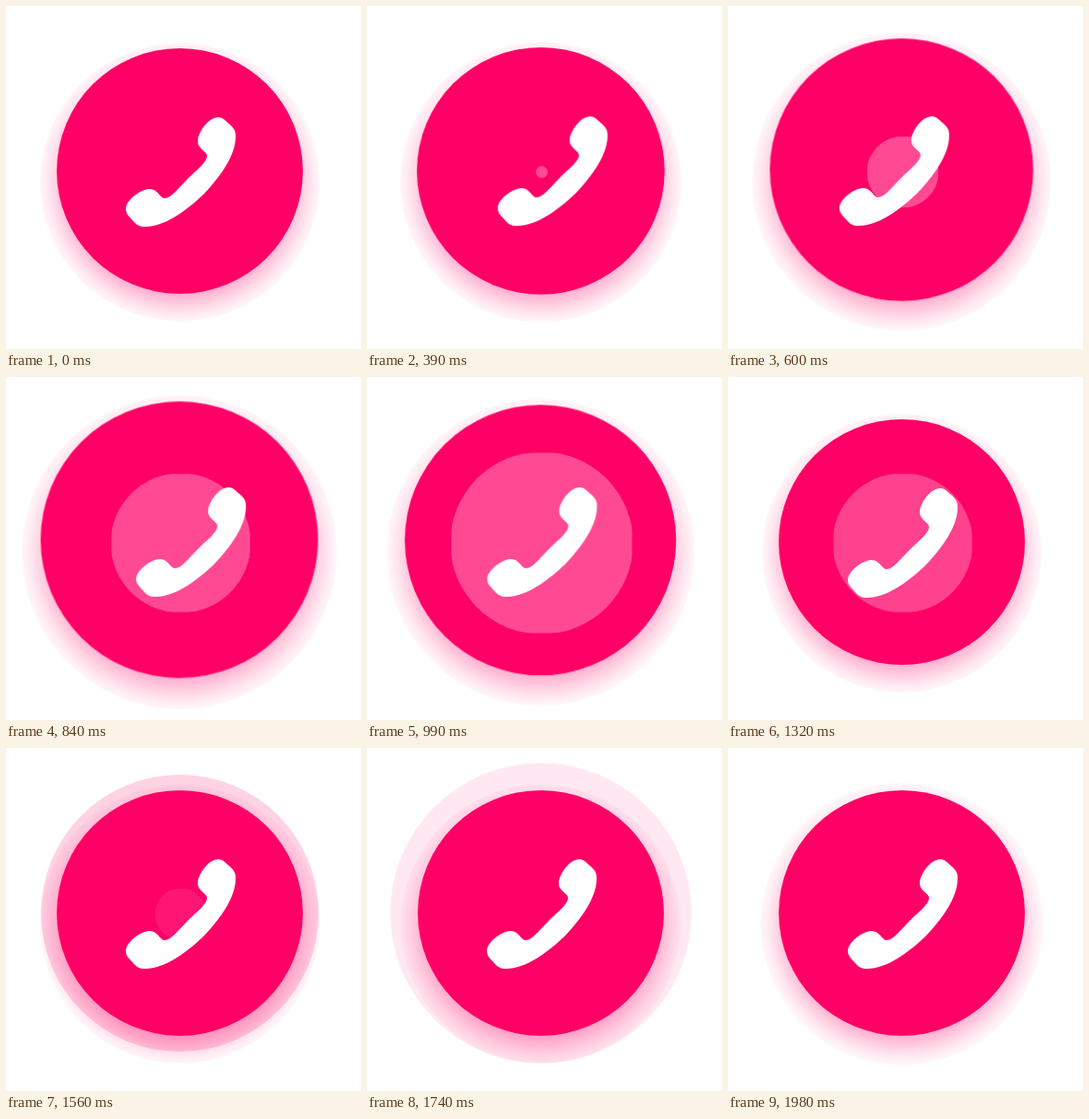
These frames come from a looping animation (385 by 373 pixels, 2400 ms). An HTML page:

```html
<!DOCTYPE html>
<html lang="en">
<head>
<meta charset="utf-8">
<title>Ringing call button</title>
<style>
  :root { --pink: #ff0066; --loop: 2400ms; }

  html, body {
    margin: 0;
    width: 100%;
    height: 100%;
    overflow: hidden;
    background: #fff;
  }

  .stage { position: relative; width: 385px; height: 373px; overflow: hidden; }
  .stage div, .phone { position: absolute; }

  .button, .shadow, .ring, .disc, .ripple, .phone {
    animation: var(--loop) linear infinite;
  }

  .button {
    left: 55px;
    top: 46px;
    width: 267px;
    height: 267px;
    transform-origin: 137.5px 153px;
    animation-name: pulse;
  }

  .button div { inset: 0; border-radius: 50%; }

  .shadow {
    box-shadow: 0 12px 30px rgba(255, 0, 102, .4);
    animation-name: trim;
  }

  .ring { background: var(--pink); animation-name: ring; }
  .disc { background: var(--pink); }

  .ripple {
    left: 73px;
    top: 64px;
    width: 233px;
    height: 233px;
    background: #fff;
    clip-path: circle(50.6%);
    animation-name: ripple;
  }

  .phone {
    left: 130px;
    top: 121px;
    width: 119px;
    height: 119px;
    overflow: visible;
    fill: #fff;
    animation-name: shake;
    animation-timing-function: ease-in-out;
  }

  @keyframes pulse {
    0%, 12.5% { transform: scale(1); animation-timing-function: ease-in-out; }
    36.25% { transform: scale(1.128); animation-timing-function: ease-in-out; }
    52.5%, 100% { transform: scale(1); }
  }

  /* The soft shadow ends in a crisp edge. */
  @keyframes trim {
    0%, 82.49% { clip-path: circle(151.5px at 50% calc(50% + 12px)); }
    82.5%, 100% { clip-path: circle(153.5px at 50% calc(50% + 12px)); }
  }

  @keyframes ring {
    0%, 54.99% { transform: scale(1); opacity: 0; }
    55% { transform: scale(1); opacity: .28; }
    81.25%, 100% { transform: scale(1.334); opacity: 0; }
  }

  @keyframes ripple {
    0%, 14.54% { transform: scale(0); opacity: .29; }
    46.33% { transform: scale(1); }
    53.25% { opacity: .29; }
    69.7% { opacity: 0; }
    70.88%, 100% { transform: scale(0); opacity: 0; }
  }

  @keyframes shake {
    0%, 9% { transform: translate(0, 0); }
    18.25%, 36.75% { transform: translate(13px, -1px); }
    27.5%, 46% { transform: translate(-13px, -1px); }
    55%, 100% { transform: translate(0, 0); }
  }
</style>
</head>
<body>
  <div class="stage">
    <div class="button">
      <div class="shadow"></div>
      <div class="ring"></div>
      <div class="disc"></div>
    </div>
    <div class="ripple"></div>
    <svg class="phone" viewBox="0 0 119 119" aria-hidden="true">
      <path d="M67 67C77 57 88 49 88 42C88 37 77 34 78 25C79 15 90 0 100 0
               C106 0 109 5 113 8C117 12 119 14 119 21C119 42 102 65 84 84
               C65 102 42 119 21 119C14 119 12 117 8 113C5 109 0 106 0 100
               C0 90 15 79 25 78C34 77 37 88 42 88C49 88 57 77 67 67Z"/>
    </svg>
  </div>
</body>
</html>
```
